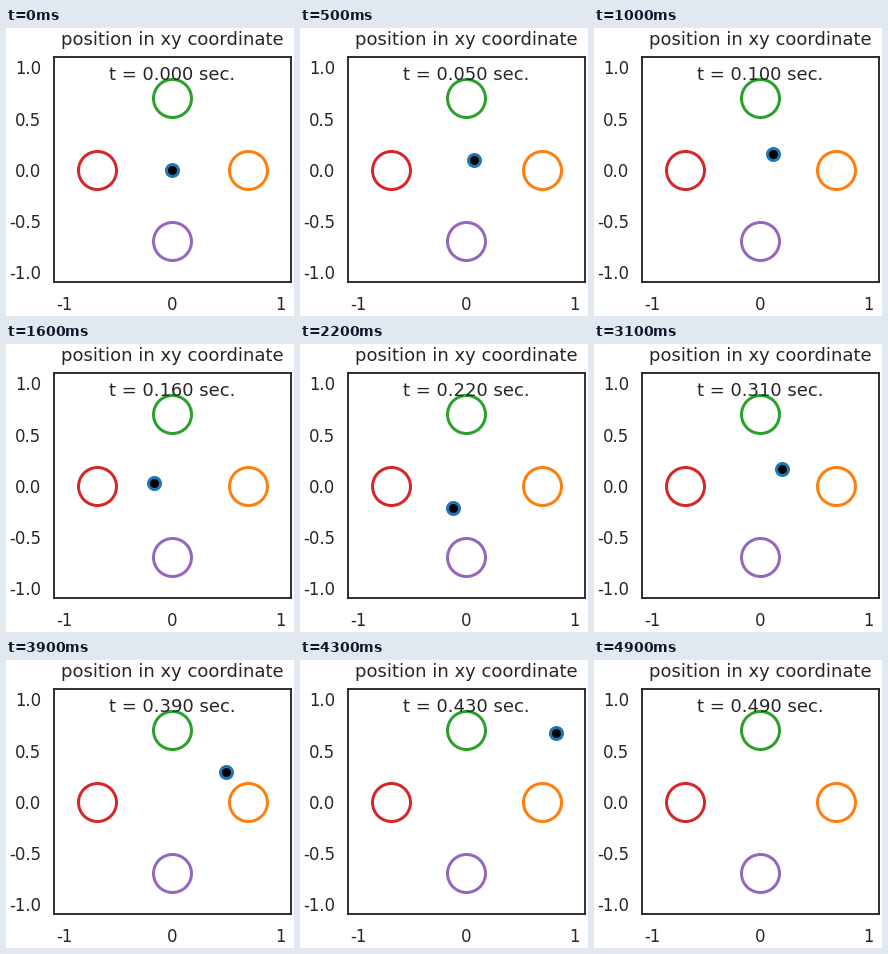
A matplotlib script for the animation above (5 s loop, 288 px wide and 288 px high).

```python
import numpy as np
import matplotlib.pyplot as plt
from matplotlib.animation import FuncAnimation

SIZE, FRAMES, INTERVAL = 288, 50, 100
INK = "#262626"
EDGE = 3

plt.rcParams.update({
    "font.family": "DejaVu Sans",
    "text.color": INK,
    "axes.edgecolor": INK,
    "axes.linewidth": 1.875,
})

# Key points of the dot's drift out of the box: step, x, y
KEYS = np.array([
    (0, 0, 0), (5, .075, .1), (10, .116, .155), (16, -.17, .025),
    (22, -.125, -.217), (27, .06, -.14), (31, .2, .165), (35, .34, .29),
    (39, .497, .29), (42, .752, .55), (45, .98, .99), (49, 1.1, 2),
])


def smooth_path(steps):
    """Cubic Hermite curve through the key points."""
    knots, points = KEYS[:, 0], KEYS[:, 1:]
    slopes = np.gradient(points, knots, axis=0)
    i = np.clip(np.searchsorted(knots, steps, "right") - 1, 0, len(knots) - 2)
    h = (knots[i + 1] - knots[i])[:, None]
    u = (steps - knots[i])[:, None] / h
    return ((1 + 2 * u) * (1 - u) ** 2 * points[i]
            + u * (1 - u) ** 2 * h * slopes[i]
            + u ** 2 * (3 - 2 * u) * points[i + 1]
            + u ** 2 * (u - 1) * h * slopes[i + 1])


track = smooth_path(np.arange(FRAMES))

fig = plt.figure(figsize=(4, 4), dpi=72, facecolor="white")
ax = fig.add_axes([47.8 / SIZE, 33.75 / SIZE, 237 / SIZE, 225 / SIZE])
ax.set(xlim=(-1.1, 1.1), ylim=(-1.1, 1.1))
ax.set_title("position in xy coordinate", fontsize=18, pad=12)
ax.set_xticks([-1, 0, 1], ["-1", "0", "1"])
y_ticks = np.linspace(-1, 1, 5)
ax.set_yticks(y_ticks, [f"{y:.1f}" for y in y_ticks])
ax.tick_params(length=0, labelsize=16.5, labelcolor=INK)
ax.tick_params(axis="x", pad=13.25)
ax.tick_params(axis="y", pad=12.3)


def add_marker(x, y, size, face, edge):
    return ax.plot([x], [y], "o", ms=size, mew=EDGE, mfc=face, mec=edge)[0]


dot = add_marker(0, 0, 12, "black", "C0")
for k in range(4):
    angle = k * np.pi / 2
    add_marker(.7 * np.cos(angle), .7 * np.sin(angle), 38, "none", f"C{k + 1}")
clock = ax.text(.2325, .9, "", fontsize=18, transform=ax.transAxes)


def update(step):
    x, y = track[step]
    dot.set_data([x], [y])
    clock.set_text(f"t = {step / 100:.3f} sec.")
    return dot, clock


anim = FuncAnimation(fig, update, frames=FRAMES, interval=INTERVAL,
                     repeat=True, repeat_delay=0)
plt.show()
```
